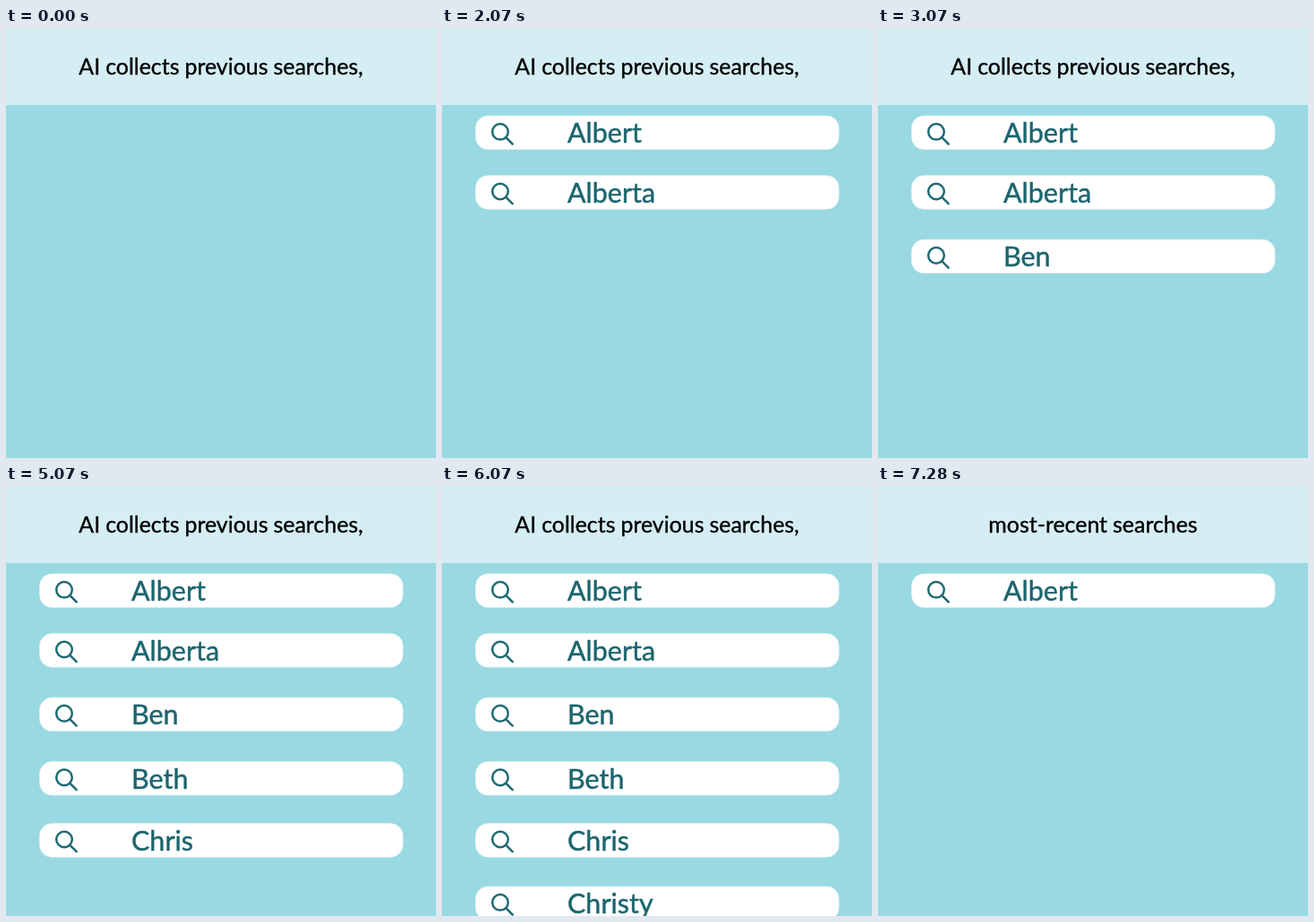
An HTML page for the animation above (8 s loop, 480 by 480 pixels).

```html
<!DOCTYPE html>
<html lang="en">
<head>
<meta charset="utf-8">
<title>Search list</title>
<style>
  html, body { margin: 0; width: 100%; height: 100%; overflow: hidden; background: #99d9e2; }
  svg { display: block; width: 100%; height: 100%; }
  text { font-family: Lato, sans-serif; }
  #caption { font-size: 24.9px; word-spacing: -.3px; text-anchor: middle; stroke: #000; stroke-width: .35; }
  .name { font-size: 30.5px; fill: #1b656e; stroke: #1b656e; stroke-width: .45; }
  .bar { fill: #fff; stroke: #e4f4f7; stroke-width: .8; }
  .lens { fill: none; stroke: #1f6b74; stroke-width: 2.5; stroke-linecap: round; }
</style>
</head>
<body>
<svg viewBox="0 0 480 480">
  <rect width="480" height="480" fill="#99d9e2"/>
  <rect width="480" height="86" fill="#d5eef3"/>
  <text id="caption" x="240" y="52"></text>
  <g id="rows"></g>
</svg>
<script>
const LOOP = 8000, FIRST = 1070, STEP = 1000;
const RESTART = 6140, SECOND = 7280;
const entries = [
  ["Albert", 98], ["Alberta", 164.7], ["Ben", 236.1],
  ["Beth", 307.6], ["Chris", 376.7], ["Christy", 447]
];

const caption = document.getElementById("caption");
const list = document.getElementById("rows");

list.innerHTML = entries.map(([name, y]) => `
  <g transform="translate(0 ${y})">
    <rect class="bar" x="37.6" y=".1" width="405.4" height="37.4" rx="13.5"/>
    <g class="lens"><circle cx="65" cy="17.8" r="8.8"/><path d="M71.4 24.2L78.7 31.5"/></g>
    <text class="name" x="140" y="29.9">${name}</text>
  </g>`).join("");
const rows = [...list.children];

function draw(t) {
  const restarted = t >= RESTART;
  const start = restarted ? SECOND : FIRST;
  caption.textContent = restarted ? "most-recent searches" : "AI collects previous searches,";
  rows.forEach((row, i) => {
    row.setAttribute("visibility", t >= start + i * STEP ? "visible" : "hidden");
  });
}

const origin = performance.now();
function tick() {
  draw((performance.now() - origin) % LOOP);
  requestAnimationFrame(tick);
}
tick();
</script>
</body>
</html>
```
